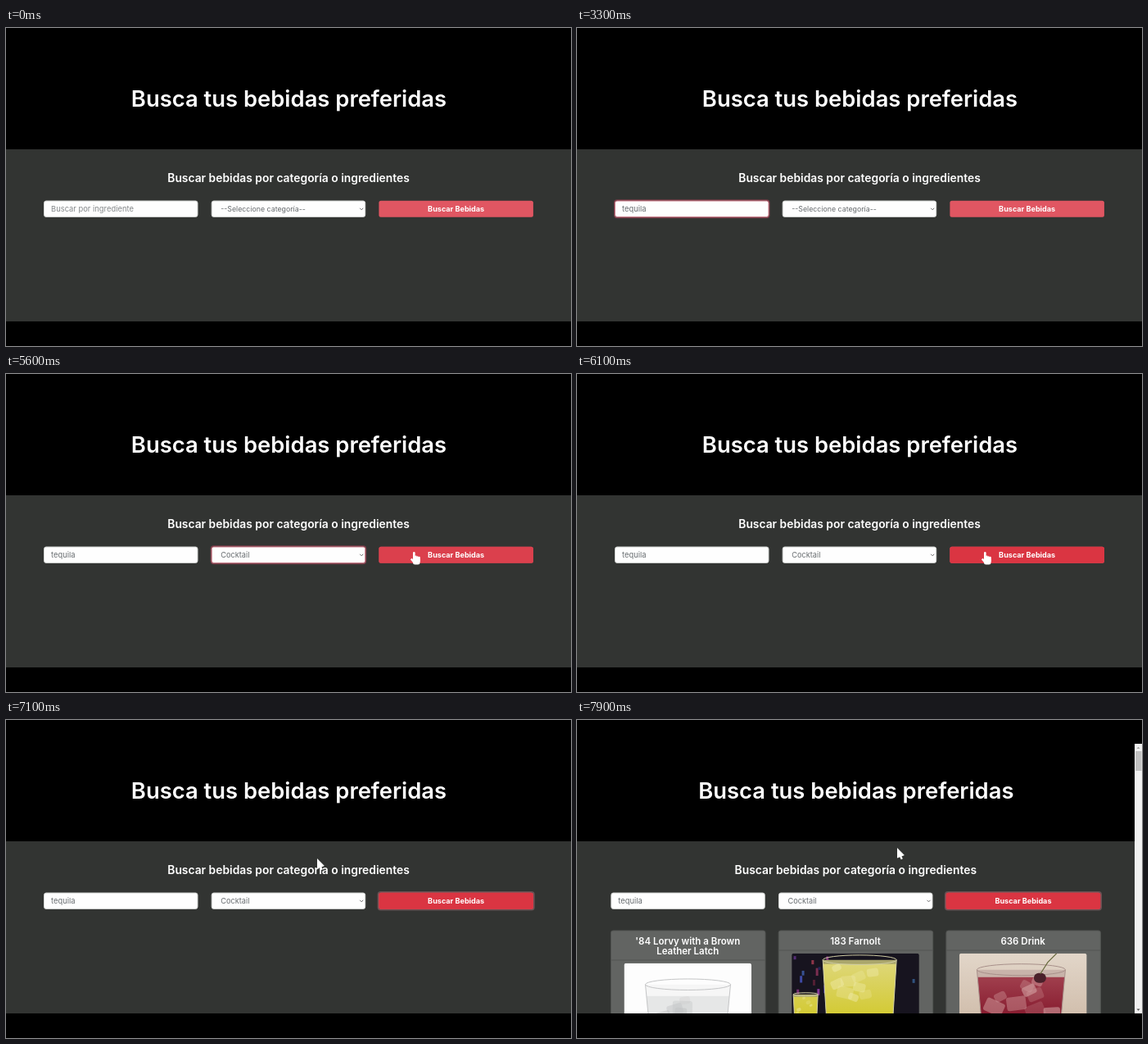
Animation, 690 px wide and 388 px high, one loop 8 s. Source, as an HTML page with a canvas:

```html
<!DOCTYPE html>
<html lang="es">
<head>
<meta charset="utf-8">
<title>Busca tus bebidas preferidas</title>
<style>
  html, body { margin: 0; width: 100%; height: 100%; overflow: hidden; background: #000; }
  canvas { display: block; width: 690px; height: 388px; }
</style>
</head>
<body>
<canvas id="stage"></canvas>
<script>
const W = 690, H = 388, LOOP = 8000, STEP = 100;
const COLUMN = 204.7, FIELD_W = 188.5, FIELD_Y = 210.7, FIELD_H = 20;
const FOCUS_INPUT = 500, FOCUS_SELECT = 3400, CHOOSE = 3600, HOVER = 5500, CLICK = 5900, RESULTS = 7300;
const WORD = 'tequila';
const KEY_TIMES = [800, 1000, 1800, 2200, 2400, 2500, 2700];
const BUTTON_SPOT = [497, 217], REST_SPOT = [380, 169];

const canvas = document.getElementById('stage');
const ctx = canvas.getContext('2d');
const dpr = window.devicePixelRatio || 1;
canvas.width = W * dpr;
canvas.height = H * dpr;

const progress = (t, start, end) => Math.max(0, Math.min(1, (t - start) / (end - start)));
const fade = (t, start) => progress(t, start, start + 150);
const smooth = k => k * k * (3 - 2 * k);

function move(t, start, end, from, to) {
  const k = smooth(progress(t, start, end));
  return from.map((v, i) => v + (to[i] - v) * k);
}

function seeded(seed) {
  return () => (seed = (seed * 16807) % 2147483647) / 2147483647;
}

function rect(x, y, w, h, color) {
  ctx.fillStyle = color;
  ctx.fillRect(x, y, w, h);
}

function box(x, y, w, h, r, fill, stroke) {
  ctx.beginPath();
  ctx.roundRect(x, y, w, h, r);
  ctx.fillStyle = fill;
  ctx.fill();
  if (stroke) { ctx.strokeStyle = stroke; ctx.lineWidth = 1; ctx.stroke(); }
}

function shape(color, ...points) {
  ctx.beginPath();
  points.forEach(p => ctx.lineTo(...p));
  ctx.fillStyle = color;
  ctx.fill();
}

function line(color, width, ...points) {
  ctx.beginPath();
  points.forEach(p => ctx.lineTo(...p));
  ctx.strokeStyle = color;
  ctx.lineWidth = width;
  ctx.stroke();
}

function withAlpha(alpha, paint) {
  ctx.globalAlpha = alpha;
  paint();
  ctx.globalAlpha = 1;
}

function text(str, x, y, size, weight, color, align = 'left') {
  ctx.font = `${weight} ${size}px Inter, sans-serif`;
  ctx.textAlign = align;
  ctx.fillStyle = color;
  ctx.fillText(str, x, y);
}

function field(x, glow) {
  withAlpha(glow, () => box(x - 1, FIELD_Y - 1.5, FIELD_W + 2, FIELD_H + 3, 4, '#793c48'));
  box(x + 0.5, FIELD_Y + 0.3, FIELD_W - 1, FIELD_H - 0.6, 2.5, '#fefefe', glow > 0.5 ? '#c9808c' : '#d3d5d3');
}

function ingredientInput(x, t) {
  const typed = KEY_TIMES.filter(time => time <= t);
  const value = WORD.slice(0, typed.length);
  field(x, fade(t, FOCUS_INPUT) - fade(t, FOCUS_SELECT));
  text(value || 'Buscar por ingrediente', x + 9, 224, 9.4, 400, value ? '#686d70' : '#85898b');
  const lastKey = typed.length ? typed[typed.length - 1] : 600;
  if (t >= 600 && t < FOCUS_SELECT && (t - lastKey) % 1060 < 500) {
    rect(x + 9.5 + (value && ctx.measureText(value).width), 215.5, 0.8, 10.5, '#444');
  }
}

function categorySelect(x, t) {
  field(x, fade(t, FOCUS_SELECT) - fade(t, CLICK));
  const chosen = t >= CHOOSE;
  text(chosen ? 'Cocktail' : '--Seleccione categoría--', x + 11.5, 224, chosen ? 9.2 : 8.8, 400, '#686d70');
  line('#6a6a6a', 1, [x + 181.5, 219.8], [x + 183.5, 221.8], [x + 185.5, 219.8]);
}

function searchButton(x, t) {
  const face = color => box(x, FIELD_Y, FIELD_W, FIELD_H, 2.5, color);
  withAlpha(fade(t, CLICK + 200), () => box(x - 1.8, FIELD_Y - 1.8, FIELD_W + 3.6, FIELD_H + 3.6, 4, '#6b5053'));
  face('#e05662');
  withAlpha(fade(t, HOVER), () => face('#da3542'));
  text('Buscar Bebidas', x + FIELD_W / 2, 224, 9.1, 700, '#fff', 'center');
}

function form(t, shift) {
  const x = 46 + shift;
  text('Busca tus bebidas preferidas', 345.5 + shift, 96, 27.4, 600, '#fff', 'center');
  text('Buscar bebidas por categoría o ingredientes', 345 + shift, 188, 13.85, 600, '#fff', 'center');
  ingredientInput(x, t);
  categorySelect(x + COLUMN, t);
  searchButton(x + 2 * COLUMN, t);
}

function gradient(top, bottom, height) {
  const g = ctx.createLinearGradient(0, 0, 0, height);
  g.addColorStop(0, top);
  g.addColorStop(1, bottom);
  return g;
}

// A tapering tumbler: wall, liquid from `level` down, tilted ice and an oval rim.
function tumbler({ cx, rim, r, level, wall, liquid, ice, edge, seed }) {
  const random = seeded(seed), bottom = 80;
  const radius = y => r * (1 - 0.1 * (y - rim) / (bottom - rim));
  const fillFrom = (y, color) => shape(color,
    [cx - radius(y), y], [cx + radius(y), y], [cx + radius(bottom), bottom], [cx - radius(bottom), bottom]);
  fillFrom(rim, wall);
  fillFrom(level, liquid);
  for (let i = 0; i < 9; i++) {
    const size = r * (0.25 + 0.25 * random());
    ctx.save();
    ctx.translate(cx + r * (random() * 1.4 - 0.7), level + (i / 9) * 40 + size * 0.4);
    ctx.rotate(random() - 0.5);
    withAlpha(0.2 + 0.4 * random(), () => box(-size / 2, -size / 3, size, size * 0.7, 3, ice));
    ctx.restore();
  }
  for (const side of [-1, 1]) line(edge, 1, [cx + side * r, rim], [cx + side * radius(bottom), bottom]);
  ctx.beginPath();
  ctx.ellipse(cx, rim, r, r * 0.13, 0, 0, Math.PI * 2);
  ctx.stroke();
}

function clearGlass() {
  rect(0, 0, 156, 80, '#fdfdfd');
  tumbler({ cx: 78, rim: 26, r: 52, level: 40, wall: '#f6f6f6', liquid: '#e6e7e7', ice: '#c2c4c5', edge: '#c4c5c6', seed: 11 });
}

function yellowDrink() {
  const random = seeded(5);
  rect(0, 0, 156, 80, '#17141f');
  for (let i = 0; i < 26; i++) {
    const color = `hsl(${200 + 160 * random()} 45% ${22 + 28 * random()}%)`;
    rect(156 * random(), 48 * random(), 3, 3 + 8 * random(), color);
  }
  const drink = { wall: '#aaa66c', liquid: gradient('#e0d985', '#d2c92e', 80), ice: '#f0ebb0', edge: '#d0cda4' };
  tumbler({ ...drink, cx: 17, rim: 50, r: 15, level: 53, seed: 3 });
  tumbler({ ...drink, cx: 83, rim: 8, r: 45, level: 13, seed: 8 });
}

function redDrink() {
  rect(0, 0, 156, 80, gradient('#e2d6c9', '#d0bdab', 80));
  tumbler({ cx: 75.5, rim: 20, r: 54, level: 29, wall: '#c8b3aa', liquid: gradient('#b05560', '#84182c', 80), ice: '#d5a5a5', edge: '#a8908a', seed: 21 });
  box(91, 24, 15, 12, 6, '#4a202a');
  line('#686a3e', 1.2, [99, 25], [108, 11], [119, 0]);
}

const CARDS = [
  { loaded: 7400, title: ["'84 Lorvy with a Brown", 'Leather Latch'], paint: clearGlass },
  { loaded: 7700, title: ['183 Farnolt'], paint: yellowDrink },
  { loaded: 7700, title: ['636 Drink'], paint: redDrink }
];

function card({ loaded, title, paint }, column, t) {
  const x = 41 + column * COLUMN, center = x + FIELD_W / 2;
  const head = title.length * 12 + 12.5;
  const pending = t < loaded;
  box(x + 0.5, 257, FIELD_W, pending ? head + 46 : 130, 2.5, '#626462', '#525452');
  rect(x + 1, 256 + head, FIELD_W - 1, 1, '#525452');
  title.forEach((row, i) => text(row, center, 274 + i * 12, 11.5, 600, '#fff', 'center'));
  if (pending) {
    box(x + 11.5, 271 + head, 166, 20.5, 2.5, '#1d1f1d');
    text('Ver Receta', center, 284.7 + head, 9, 700, '#fff', 'center');
    return;
  }
  ctx.save();
  ctx.translate(x + 16.5, 260.2 + head);
  ctx.beginPath();
  ctx.roundRect(0, 0, 155.5, 120, 2.5);
  ctx.clip();
  paint();
  ctx.restore();
}

function scrollbar(t) {
  const pending = CARDS.filter(c => t < c.loaded).length;
  rect(681, 29, 9, 329, '#f1f1f1');
  rect(682, 38, 7.5, 24 + 2.8 * pending, '#c1c1c1');
  shape('#a3a3a3', [683.5, 35], [687.5, 35], [685.5, 32.8]);
  shape('#505050', [683.5, 352.5], [687.5, 352.5], [685.5, 354.7]);
}

function arrow(x, y) {
  shape('#fff', [x, y], [x, y + 12.5], [x + 8.9, y + 9]);
  line('#fff', 2.4, [x + 3, y + 8], [x + 5.8, y + 13.8]);
}

function beam(x, y) {
  rect(x, y - 6, 1, 13, '#333');
  for (const end of [-6, 6]) rect(x - 2, y + end, 5, 1, '#333');
}

function hand(x, y) {
  box(x, y, 2.6, 11, 1.3, '#fff');
  for (let i = 1; i < 4; i++) box(x + i * 2.1, y + 4 + i * 0.6, 2.5, 7, 1.2, '#fff');
  box(x, y + 7, 8.5, 8.5, 2.5, '#fff');
  line('#fff', 2.4, [x - 2.2, y + 8.5], [x + 1.5, y + 13]);
}

function pointer(t) {
  if (t >= 300 && t < 800) {
    const [x, y] = move(t, 300, 500, [270, 82], [145, 218]);
    (y > FIELD_Y ? beam : arrow)(x, y);
  } else if (t >= 4800) {
    const [x, y] = t < 6400 ? move(t, 4800, 5500, [299, 104], BUTTON_SPOT)
      : t < RESULTS ? move(t, 6400, 7000, BUTTON_SPOT, REST_SPOT)
      : move(t, RESULTS, 7900, REST_SPOT, [391, 156]);
    (x > 455 && y > FIELD_Y ? hand : arrow)(x, y);
  }
}

function draw(t) {
  const results = t >= RESULTS;
  ctx.setTransform(dpr, 0, 0, dpr, 0, 0);
  rect(0, 0, W, H, '#000');
  rect(0, 148, W, 210, '#323432');
  form(t, results ? -4.7 : 0);
  if (results) {
    CARDS.forEach((c, column) => card(c, column, t));
    rect(0, 358, W, 30, '#000');
    scrollbar(t);
  }
  pointer(t);
}

function tick() {
  const t = performance.now() % LOOP;
  draw(Math.floor(t / STEP) * STEP);
  requestAnimationFrame(tick);
}
tick();
</script>
</body>
</html>
```
